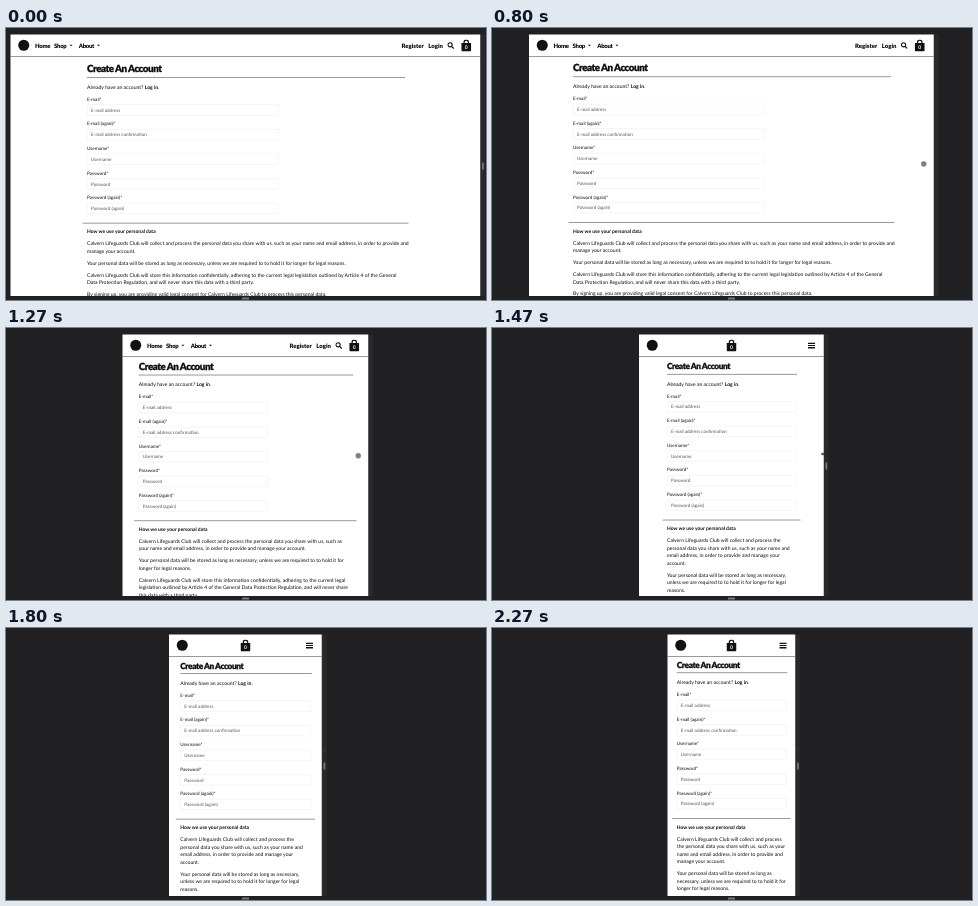
Recreate the animation shown at these times as an HTML page. Size 480 by 272 pixels, loop 2.39 s.

```html
<!DOCTYPE html>
<html lang="en">
<head>
<meta charset="utf-8">
<title>Create An Account</title>
<style>
/* 1rem is one stage pixel, laid out at 4x and scaled down for even glyph spacing */
html { font-size: 4px; }
html, body { margin: 0; width: 100%; height: 100%; overflow: hidden; background: #202022; }
#stage {
  position: absolute; left: 0; top: 0; width: 480rem; height: 272rem; overflow: hidden;
  transform: scale(.25); transform-origin: 0 0;
  background: #202022; color: #0c0c0c;
  font: 5.06rem/7.55rem Lato, sans-serif; text-rendering: geometricPrecision;
}
#stage * { box-sizing: border-box; }
#page, #rail, #foot, #grip, #touch, #arrow, nav > *, main > * { position: absolute; }
#page { top: 6.5rem; height: 261.5rem; overflow: hidden; background: #fff; }
#rail { top: 6.5rem; width: 5rem; height: 261.5rem; background: #29292b; }
#foot { left: 236rem; top: 269.5rem; width: 7rem; height: 2rem; background: #77777a; }
#grip { top: 134.5rem; width: 1.8rem; height: 7rem; background: #77777a; }
#touch { width: 5.4rem; height: 5.4rem; border-radius: 50%; background: #808080; border: .5rem solid #666; }
#arrow { width: 4rem; height: 4rem; }

nav { position: absolute; inset: 0 0 auto; height: 22rem; border-bottom: .7rem solid #333; }
nav > * { top: 7rem; font-size: 6rem; line-height: 8rem; font-weight: 900; white-space: nowrap; }
.left { letter-spacing: -.055em; }
.drop::after {
  content: ""; position: absolute; left: calc(100% + 3rem); top: 3.2rem;
  border: 1.7rem solid transparent; border-top-color: #0c0c0c; border-bottom: 0;
}
#logo { left: 7.7rem; top: 5.3rem; width: 11rem; height: 11rem; border-radius: 50%; background: #111; }
#find { right: 26rem; top: 7.5rem; width: 7rem; height: 7rem; }
#bag { right: 9rem; top: 5rem; width: 10rem; height: 12rem; }
#menu { right: 8.8rem; top: 8.3rem; width: 7rem; height: 5.6rem;
  background: linear-gradient(#111 0 1.2rem, #fff 0 2.2rem, #111 0 3.4rem, #fff 0 4.4rem, #111 0); }
.slim .full, #page:not(.slim) #menu { display: none; }
.slim #bag { right: calc(50% - 5rem); }

main { position: absolute; top: -6.5rem; left: 50%; }
h1, h2, p { margin: 0; }
h1 { left: 4.6rem; top: 34.5rem; font-size: 9.8rem; line-height: 12rem; font-weight: 900;
  letter-spacing: -.048em; white-space: nowrap; -webkit-text-stroke: .25rem #0c0c0c; }
.slim h1 { top: 35.4rem; font-size: 8.3rem; }
hr { margin: 0; border: 0; height: .7rem; background: #777; }
#rule1 { left: 4.6rem; right: 3.4rem; top: 49rem; }
#rule2 { left: 0; right: 0; top: 194.8rem; }
#login { left: 4.6rem; top: 55.2rem; white-space: nowrap; }
#form { left: 4.6rem; right: 4.2rem; top: 67.5rem; font-size: 4.58rem; }
#form div { height: 24.6rem; }
#form label { display: block; height: 9.1rem; line-height: 7rem; }
#form span { display: block; width: 60.4%; height: 10.8rem; padding-left: 3.8rem; line-height: 10rem;
  border: .4rem solid #d3d6d9; border-radius: .8rem; color: #50555a; }
.slim #form span { width: 100%; }
#terms { left: 4.6rem; right: 4.2rem; top: 199.7rem; }
.wide #terms { right: -2rem; }
#page:not(.wide) br { display: none; }
h2 { font-size: 4.95rem; line-height: 7.55rem; margin-bottom: 4.4rem; }
#terms p { margin-bottom: 4.4rem; }
</style>
</head>
<body>
<div id="stage">
  <div id="rail"></div>
  <div id="foot"></div>
  <div id="page">
    <main>
      <h1>Create An Account</h1>
      <hr id="rule1">
      <p id="login">Already have an account? <b>Log in</b>.</p>
      <div id="form"></div>
      <hr id="rule2">
      <div id="terms">
        <h2>How we use your personal data</h2>
        <p>Calvern Lifeguards Club will collect and process the personal data you share with us, such as your name and email address, in order to provide and<br> manage your account.</p>
        <p>Your personal data will be stored as long as necessary, unless we are required to to hold it for longer for legal reasons.</p>
        <p>Calvern Lifeguards Club will store this information confidentially, adhering to the current legal legislation outlined by Article 4 of the General<br> Data Protection Regulation, and will never share this data with a third party.</p>
        <p>By signing up, you are providing valid legal consent for Calvern Lifeguards Club to process this personal data.</p>
      </div>
    </main>
    <nav>
      <div id="logo"></div>
      <span class="left full" style="left:24.6rem">Home</span>
      <span class="left full drop" style="left:43.6rem">Shop</span>
      <span class="left full drop" style="left:68.2rem">About</span>
      <span class="full" style="right:56.6rem">Register</span>
      <span class="full" style="right:37.4rem">Login</span>
      <svg id="find" class="full" viewBox="0 0 7 7" fill="none" stroke="#111" stroke-width="1.1">
        <circle cx="2.8" cy="2.8" r="2.1"/><path d="M4.3 4.3 6.5 6.5"/>
      </svg>
      <svg id="bag" viewBox="0 0 10 12">
        <path d="M0 3.5H10V10.5Q10 12 8.5 12H1.5Q0 12 0 10.5Z" fill="#111"/>
        <path d="M2.8 4.5V2.9a2.2 2.2 0 0 1 4.4 0V4.5" fill="none" stroke="#111" stroke-width="1.2"/>
        <text x="5" y="9.6" fill="#fff" font-size="5" font-weight="700" text-anchor="middle">0</text>
      </svg>
      <div id="menu"></div>
    </nav>
  </div>
  <div id="grip"></div>
  <div id="touch"></div>
  <svg id="arrow" viewBox="0 0 4 4"><path d="M0 2 1.4.7V1.5H2.6V.7L4 2 2.6 3.3V2.5H1.4V3.3Z" fill="#111" stroke="#777" stroke-width=".25"/></svg>
</div>
<script>
const LOOP = 2390, FPS = 15, LAST = 34, CENTER = 239.4;
const $ = id => document.getElementById(id);
const page = $('page'), main = document.querySelector('main');

const fields = [
  ['E-mail*', 'E-mail address'],
  ['E-mail (again)*', 'E-mail address confirmation'],
  ['Username*', 'Username'],
  ['Password*', 'Password'],
  ['Password (again)*', 'Password (again)']
];
$('form').innerHTML = fields
  .map(([label, hint]) => `<div><label>${label}</label><span>${hint}</span></div>`).join('');

// [time, value] keys
const edge = [[530, 4.5], [600, 7], [800, 37], [1000, 71], [1070, 86], [1470, 147],
  [1530, 150], [1800, 163], [2070, 168.5], [2270, 175.5]];
const rise = [[530, 0], [800, .6], [1070, 1.6], [1470, 3.1], [1800, 4], [2270, 4.6]];
const hand = [[530, 137], [800, 136], [1070, 129.5], [1470, 126], [1800, 123], [2270, 121]];

function at(keys, t) {
  if (t <= keys[0][0]) return keys[0][1];
  for (let i = 1; i < keys.length; i++) {
    const [t0, a] = keys[i - 1], [t1, b] = keys[i];
    if (t <= t1) return a + (b - a) * (t - t0) / (t1 - t0);
  }
  return keys[keys.length - 1][1];
}

// Responsive container width for a page width
function container(w) {
  if (w >= 360) return 326;
  if (w >= 238) return .905 * w;
  if (w >= 182) return 138;
  return .84 * w + 11;
}

const stepTime = n => Math.round(n * 100 / FPS) * 10;
const place = (el, x, y) => { el.style.left = x + 'rem'; if (y !== undefined) el.style.top = y + 'rem'; };

function draw(t) {
  const left = at(edge, t), right = 2 * CENTER - left, w = right - left;
  const inner = container(w), y = at(hand, t);
  page.className = w >= 360 ? 'wide' : w >= 238 ? 'mid' : 'slim';
  page.style.width = w + 'rem';
  place(page, left);
  main.style.width = inner + 'rem';
  main.style.marginLeft = -inner / 2 + 'rem';
  main.style.transform = `translateY(${-at(rise, t)}rem)`;

  const dragging = t >= 600 && t < 1400;
  place($('rail'), right);
  place($('grip'), right + 1.6);
  place($('touch'), right - 12.7, y - 2.7);
  place($('arrow'), right + (t < 1600 ? -2.8 : .5), y - 2);
  $('grip').style.display = dragging ? 'none' : '';
  $('touch').style.display = dragging ? '' : 'none';
  $('arrow').style.display = t >= 1400 ? '' : 'none';
}

let shown = -1;
const start = performance.now();
function tick() {
  const t = (performance.now() - start) % LOOP;
  let n = Math.min(LAST, Math.ceil(t * FPS / 1000) + 1);
  while (n > 0 && stepTime(n) > t) n--;
  if (n !== shown) draw(stepTime(shown = n));
  requestAnimationFrame(tick);
}
tick();
</script>
</body>
</html>
```
